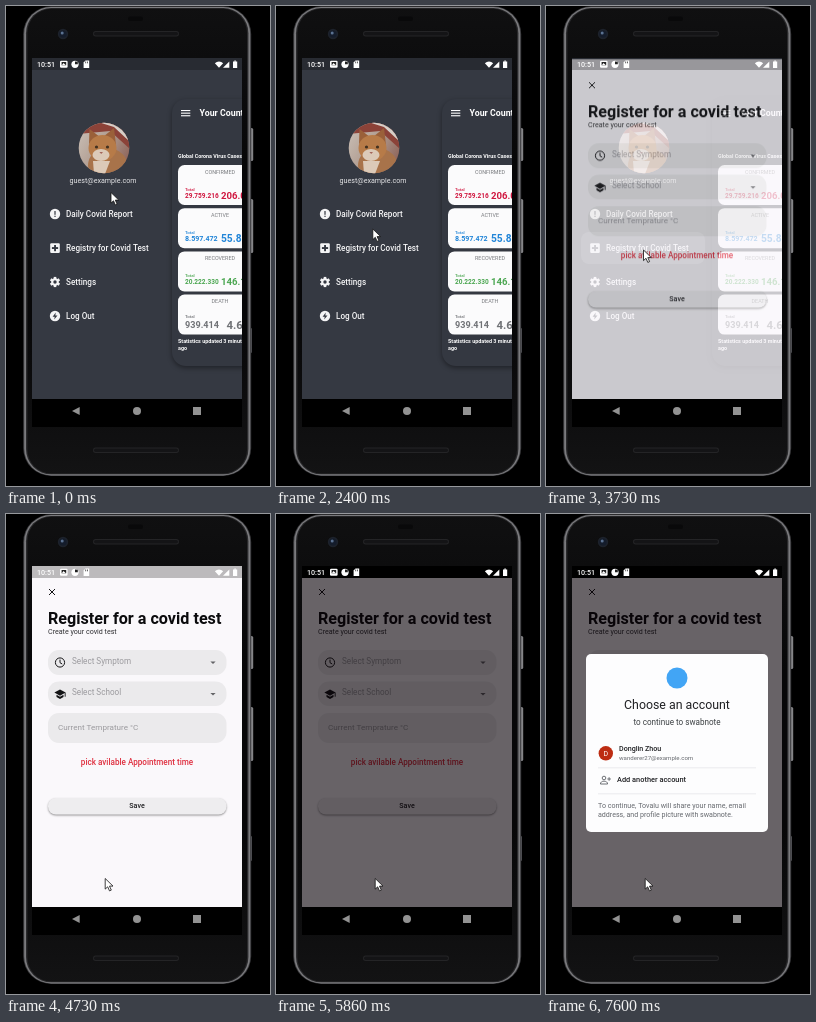
An HTML page with a canvas for the animation above (8 s loop, 264x480 px).

```html
<!DOCTYPE html>
<html lang="en">
<head>
<meta charset="utf-8">
<title>Covid test registration</title>
<style>
html, body { margin: 0; width: 264px; height: 480px; overflow: hidden; background: #000; }
canvas { display: block; width: 264px; height: 480px; }
</style>
</head>
<body>
<canvas id="stage"></canvas>
<script>
const W = 264, H = 480, LOOP = 8000;
const SCREEN = { x: 26, y: 52, w: 210, h: 341 };
const dpr = window.devicePixelRatio || 1;
const stage = document.getElementById('stage');
let c;

function prepare(canvas) {
  canvas.width = W * dpr;
  canvas.height = H * dpr;
  const context = canvas.getContext('2d');
  context.scale(dpr, dpr);
  return context;
}

// Renders a drawing once so it can be faded as a group.
function layer(draw) {
  const canvas = document.createElement('canvas');
  c = prepare(canvas);
  draw();
  return canvas;
}

function place(canvas, alpha = 1, dy = 0) {
  c.save();
  c.globalAlpha = alpha;
  c.drawImage(canvas, 0, dy, W, H);
  c.restore();
}

function text(s, x, y, size, color, weight = 400, align = 'left') {
  c.font = `${weight} ${size}px Roboto, sans-serif`;
  c.textAlign = align;
  c.textBaseline = 'middle';
  c.fillStyle = color;
  c.fillText(s, x, y);
}

function rect(x, y, w, h, color) {
  c.fillStyle = color;
  c.fillRect(x, y, w, h);
}

function box(x, y, w, h, r, color) {
  c.beginPath();
  c.roundRect(x, y, w, h, r);
  c.fillStyle = color;
  c.fill();
}

function oval(x, y, rx, ry, color, turn = 0) {
  c.beginPath();
  c.ellipse(x, y, rx, ry, turn, 0, 7);
  c.fillStyle = color;
  c.fill();
}

const dot = (x, y, r, color) => oval(x, y, r, r, color);

function ring(x, y, r, color, width) {
  c.beginPath();
  c.arc(x, y, r, 0, 7);
  c.strokeStyle = color;
  c.lineWidth = width;
  c.stroke();
}

function poly(points, color) {
  c.beginPath();
  points.forEach(([x, y]) => c.lineTo(x, y));
  c.closePath();
  c.fillStyle = color;
  c.fill();
}

function line(points, color, width) {
  c.beginPath();
  points.forEach(([x, y], i) => i % 2 ? c.lineTo(x, y) : c.moveTo(x, y));
  c.strokeStyle = color;
  c.lineWidth = width;
  c.stroke();
}

function gradient(x1, y1, x2, y2, colors) {
  const g = c.createLinearGradient(x1, y1, x2, y2);
  colors.forEach((color, i) => g.addColorStop(i / (colors.length - 1), color));
  return g;
}

function shadow(color, blur, y) {
  c.shadowColor = color;
  c.shadowBlur = blur * dpr;
  c.shadowOffsetY = y * dpr;
}

function fillScreen(color, h = SCREEN.h) {
  rect(SCREEN.x, SCREEN.y, SCREEN.w, h, color);
}

function clipScreen() {
  c.beginPath();
  c.rect(SCREEN.x, SCREEN.y, SCREEN.w, SCREEN.h);
  c.clip();
}

function drawPhone() {
  rect(0, 0, W, H, '#000');
  for (const [y, h] of [[122, 33], [193, 54]]) box(243, y, 4.2, h, 1.5, '#858588');
  box(243, 322, 2.8, 25, 1, '#68686b');

  const body = gradient(0, 0, 0, 470, ['#101011', '#070708', '#070708', '#131314']);
  const edges = [[17.2, '#3a3a3d'], [18.2, '#7b7b7e'], [20, '#29292b'], [21.4, body]];
  for (const [x, color] of edges) {
    const inset = x - 17.2;
    box(x, 0.3 + inset * 0.6, 228 - inset * 2, 469.7 - inset * 1.2, 28 - inset, color);
  }
  for (const y of [25, 441.5]) {
    box(87, y, 86, 5.5, 2.7, '#242426');
    box(88, y + 0.9, 84, 3.7, 1.8, '#141416');
  }
  box(122, 10.5, 15, 4.5, 2.2, '#09090a');
  dot(57, 28, 5.2, '#1d222b');
  dot(57, 28, 3.6, '#141c2b');
  dot(56.2, 27, 1.5, '#5b7292');
  rect(26, 393, 210, 28, '#000');
  poly([[66, 405], [73.7, 400.9], [73.7, 409.1]], '#929292');
  dot(131, 405, 4, '#929292');
  rect(187, 401, 8, 8, '#929292');
}

function drawAvatar() {
  const fur = '#b77b48', cream = '#dccab8';
  c.save();
  c.beginPath();
  c.arc(98, 142, 25.3, 0, 7);
  c.clip();
  rect(72, 116, 52, 52, gradient(73, 125, 123, 155, ['#c8bdb4', '#b09c90', '#8d6258']));
  poly([[72, 116], [112, 116], [124, 136], [124, 143], [104, 125], [72, 128]], '#8b4238');
  poly([[92, 116], [114, 116], [124, 130], [124, 136], [108, 121]], '#d6cfc8');
  oval(102, 160, 20, 18, '#a8734a', 0.2);
  poly([[83, 138], [83.5, 123], [94, 131]], '#9a6039');
  poly([[97, 131], [108, 122], [110, 139]], '#9a6039');
  oval(96.5, 142, 14, 13, fur);
  oval(95, 149, 8.5, 6, cream);
  poly([[87, 155], [104, 155], [99, 168], [88, 168]], cream);
  dot(90.5, 141, 1.6, '#42301f');
  dot(101.5, 141, 1.6, '#42301f');
  poly([[93.4, 146], [97, 146], [95.2, 148]], '#a4655a');
  c.restore();
}

function drawMenu() {
  const white = '#f4f4f5', dark = '#343841';
  const items = ['Daily Covid Report', 'Registry for Covid Test', 'Settings', 'Log Out'];
  items.forEach((label, i) => text(label, 60, 208.4 + i * 34, 8.15, white, 500));

  dot(49, 208, 5.2, white);
  rect(48.4, 205, 1.2, 3.8, dark);
  rect(48.4, 209.7, 1.2, 1.3, dark);

  box(44.2, 237.3, 9.6, 9.6, 1.2, white);
  rect(48.1, 239, 1.9, 6.2, dark);
  rect(45.9, 241.1, 6.2, 1.9, dark);

  for (let i = 0; i < 6; i++) {
    c.save();
    c.translate(49, 276);
    c.rotate(i * Math.PI / 3);
    rect(-1.3, -5.1, 2.6, 3, white);
    c.restore();
  }
  dot(49, 276, 3.8, white);
  dot(49, 276, 1.7, dark);

  dot(49, 310, 5.2, white);
  poly([[49.8, 306.6], [46.6, 310.7], [48.7, 310.7], [48.2, 313.6], [51.5, 309.4], [49.3, 309.4]], dark);
}

function drawHome() {
  c.save();
  shadow('rgba(0,0,0,.4)', 5, 2);
  box(166, 93, 120, 267, 14, '#343841');
  c.restore();
  for (let i = 0; i < 3; i++) rect(175, 104 + i * 2.6, 9.3, 1.1, '#fff');
  text('Your Country', 193.5, 107, 8.8, '#fff', 700);
  text('Global Corona Virus Cases', 172, 150.5, 5.35, '#fff', 700);
  const cards = [
    ['CONFIRMED', '29.759.216', 6.5, '206.000', 9.6, 215, '#d0163f'],
    ['ACTIVE', '8.597.472', 7.1, '55.800', 10.2, 215, '#2185d8'],
    ['RECOVERED', '20.222.330', 6.5, '146.100', 9.6, 215, '#4aa650'],
    ['DEATH', '939.414', 9.1, '4.600', 11.4, 220.5, '#707276']
  ];
  cards.forEach(([title, total, size, recent, recentSize, x, color], i) => {
    const y = 159 + i * 43.2;
    box(172, y, 84, 40, 6.5, '#fbfbfc');
    text(title, 214, y + 7, 5.4, '#77797d', 400, 'center');
    text('Total', 179, y + 31 - size * 0.97, 4.4, color, 500);
    text(total, 179, y + 31, size, color, 700);
    text(recent, x, y + 30.8, recentSize, color, 700);
  });
  text('Statistics updated 3 minutes', 172, 335.3, 5.4, '#fff', 700);
  text('ago', 172, 342, 5.4, '#fff', 700);
}

function drawDrawer() {
  fillScreen('#353942');
  drawAvatar();
  text('guest@example.com', 97, 174.8, 7.12, '#e4e4e6', 400, 'center');
  drawMenu();
  drawHome();
}

function drawForm() {
  const ink = '#141416', hint = '#9b9a9e', field = '#ebeaec';
  fillScreen('#faf8fb');
  line([[43, 75], [49, 81], [49, 75], [43, 81]], ink, 1);
  text('Register for a covid test', 42, 104.9, 16.15, '#0b0b0d', 700);
  text('Create your covid test', 42, 118, 7.12, '#303033');
  [[136, 25], [167.5, 24.5], [199, 30]].forEach(([y, h]) => box(42, y, 178.5, h, 11, field));

  ring(54, 148.5, 4.6, ink, 1);
  c.beginPath();
  c.moveTo(54, 145.6);
  c.lineTo(54, 148.7);
  c.lineTo(56.2, 150);
  c.stroke();
  poly([[48.4, 178.6], [54, 175.6], [59.6, 178.6], [54, 181.7]], ink);
  poly([[50.5, 180.8], [54, 182.7], [57.5, 180.8], [57.5, 183], [54, 185], [50.5, 183]], ink);
  rect(58.7, 178.6, 0.9, 4.1, ink);

  text('Select Symptom', 66, 147.2, 8.13, hint);
  text('Select School', 66, 178.7, 8.13, hint);
  text('Current Temprature °C', 52, 213.7, 8.1, hint);
  for (const y of [147.4, 179]) poly([[204.4, y], [209.6, y], [207, y + 2.6]], '#636366');
  text('pick avilable Appointment time', 131, 248.3, 8.13, '#df3040', 500, 'center');

  c.save();
  shadow('rgba(0,0,0,.4)', 2, 1);
  box(42, 284, 178.5, 16.5, 8, '#eeedef');
  c.restore();
  text('Save', 131, 292.4, 7.12, '#202023', 500, 'center');
}

function drawDialog() {
  const ink = '#202124', grey = '#66696e';
  box(40, 140, 182, 178, 5, '#fdfdfe');
  dot(131, 164, 10.5, '#42a5f5');
  text('Choose an account', 131, 191.2, 12.35, ink, 400, 'center');
  text('to continue to swabnote', 131, 208.3, 8.13, '#3c4043', 400, 'center');
  dot(59.8, 239.3, 7.2, '#bd2c12');
  text('D', 59.8, 239.6, 7, '#fff', 400, 'center');
  text('Donglin Zhou', 73, 235.3, 7.12, ink, 500);
  text('wanderer27@example.com', 73, 244.2, 6.1, grey);
  rect(52, 253.6, 158, 0.6, '#dcdde0');

  ring(58, 264, 1.8, '#5f6368', 0.9);
  c.beginPath();
  c.moveTo(54.4, 270);
  c.bezierCurveTo(54.4, 266.2, 61.6, 266.2, 61.6, 270);
  c.closePath();
  c.stroke();
  line([[61.3, 265], [64.9, 265], [63.1, 263.2], [63.1, 266.8]], '#5f6368', 0.9);
  text('Add another account', 71, 266.3, 7.4, ink, 500);
  rect(52, 279.6, 158, 0.6, '#dcdde0');
  text('To continue, Tovalu will share your name, email', 52, 292.3, 7.1, grey);
  text('address, and profile picture with swabnote.', 52, 301.2, 7.1, grey);
}

function drawStatusIcons() {
  const white = '#fff', gap = '#222';
  text('10:51', 31, 58.6, 7.1, white, 500);
  box(54, 54.7, 7.6, 7, 1.2, white);
  box(55.6, 56, 4.6, 3.4, 0.4, gap);
  poly([[55.6, 59.6], [57.5, 57], [60.2, 59.6]], white);
  dot(69, 58.3, 3.6, white);
  poly([[69, 58.3], [69, 55.5], [71.8, 55.8], [71.8, 58.3]], gap);
  poly([[79.5, 54.6], [83.2, 54.6], [83.2, 62], [77.6, 62], [77.6, 56.5]], white);
  for (const x of [79.4, 81.2]) rect(x, 55.5, 0.7, 1.8, gap);
  c.beginPath();
  c.moveTo(213, 61.8);
  c.arc(213, 61.8, 6.2, -2.3, -0.84);
  c.fillStyle = white;
  c.fill();
  poly([[217, 61.8], [223.3, 61.8], [223.3, 55.5]], white);
  rect(227, 55.5, 4.2, 6.5, white);
  rect(228.2, 54.6, 1.8, 1, white);
}

function drawCursor([x, y]) {
  const points = [[0, 0], [0, 10.6], [2.5, 8.3], [4.3, 12.4], [6.1, 11.6], [4.3, 7.6], [7.8, 7.6]];
  c.save();
  c.translate(x, y);
  c.lineJoin = 'round';
  poly(points, '#fff');
  c.strokeStyle = '#111';
  c.lineWidth = 0.8;
  c.stroke();
  c.restore();
}

const clamp = v => Math.min(1, Math.max(0, v));
const span = (t, from, to) => clamp((t - from) / (to - from));

function bezier(x1, y1, x2, y2) {
  const at = (a, b, s) => 3 * a * s * (1 - s) ** 2 + 3 * b * s * s * (1 - s) + s ** 3;
  return x => {
    let lo = 0, hi = 1;
    for (let i = 0; i < 20; i++) {
      const mid = (lo + hi) / 2;
      if (at(x1, x2, mid) < x) lo = mid; else hi = mid;
    }
    return at(y1, y2, lo);
  };
}
const fastOutSlowIn = bezier(0.4, 0, 0.2, 1);
const easeIn = bezier(0.42, 0, 1, 1);
const easeInOut = bezier(0.42, 0, 0.58, 1);
const easeOut = v => 1 - (1 - v) ** 3;

function follow(keys, t) {
  let i = 0;
  while (i < keys.length - 2 && t >= keys[i + 1][0]) i++;
  const [from, ...a] = keys[i], [to, ...b] = keys[i + 1];
  const p = span(t, from, to);
  return a.map((v, k) => v + (b[k] - v) * p);
}

const pointerKeys = [[2000, 105, 186.5], [2400, 96.8, 223], [2600, 97.5, 244]];
function pointer(t) {
  if (t < 3800) return follow(pointerKeys, t);
  const p = easeInOut(span(t, 3800, 4400));
  return [97.5 + 1.7 * p, 244 + 120.5 * p];
}

const dimKeys = [[5600, 0], [5667, 0.09], [5733, 0.22], [5800, 0.42], [5867, 0.6]];

const phone = layer(drawPhone);
const drawer = layer(drawDrawer);
const form = layer(drawForm);
const dialog = layer(drawDialog);
const statusIcons = layer(drawStatusIcons);
c = prepare(stage);

function render(t) {
  place(phone);
  c.save();
  clipScreen();
  const open = span(t, 3480, 3780);
  if (open < 1) {
    place(drawer);
    const press = span(t, 3330, 3467);
    if (press) box(35, 226, 124, 32, 8, `rgba(215,218,225,${0.17 * press})`);
  }
  if (open > 0) place(form, easeIn(open), SCREEN.h / 4 * (1 - fastOutSlowIn(open)));

  const [dim] = follow(dimKeys, t);
  fillScreen(`rgba(7,1,5,${dim})`);
  fillScreen(dim ? '#000' : 'rgba(0,0,0,.25)', 12);
  const shown = span(t, 7133, 7600);
  if (shown) place(dialog, span(t, 7133, 7400), 11 * (1 - easeOut(shown)));
  place(statusIcons);
  c.restore();
  drawCursor(pointer(t));
}

// The picture advances in 15 steps per second.
const start = performance.now();
function tick() {
  const t = (performance.now() - start) % LOOP;
  render(Math.floor((t + 7) * 0.015) / 0.015);
  requestAnimationFrame(tick);
}
tick();
</script>
</body>
</html>
```
